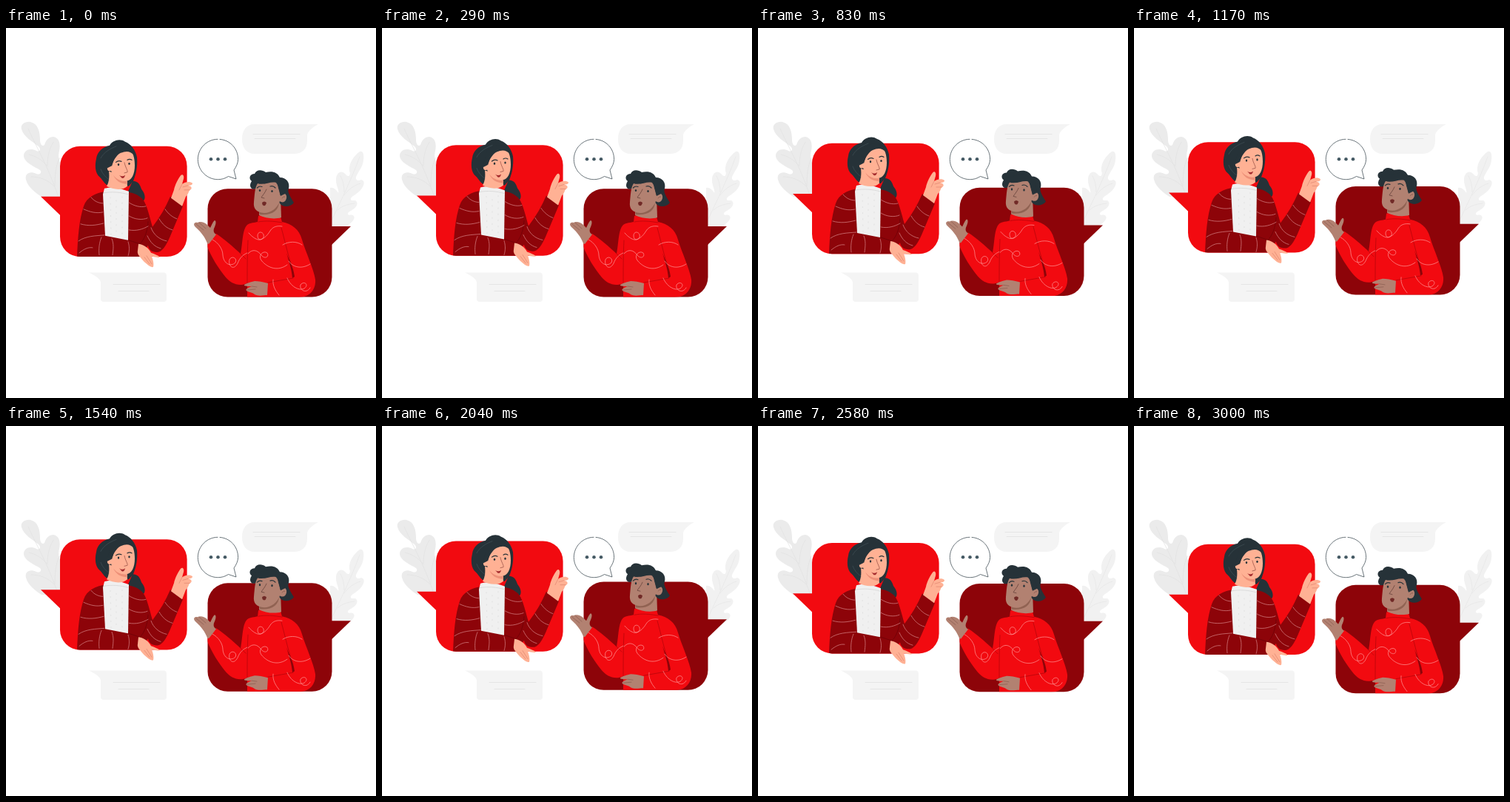
Write an HTML page with a canvas that moves like this. It is 500 by 500 pixels and loops after 3.04 s.

```html
<!DOCTYPE html>
<html lang="en">
<head>
<meta charset="utf-8">
<title>Conversation</title>
<style>
html, body { margin: 0; width: 100%; height: 100%; overflow: hidden; background: #fff; }
canvas { display: block; width: 500px; height: 500px; }
</style>
</head>
<body>
<canvas id="stage"></canvas>
<script>
const canvas = document.getElementById('stage');
const ctx = canvas.getContext('2d');
const scale = window.devicePixelRatio || 1;
canvas.width = canvas.height = 500 * scale;

const LOOP = 3040, FLOAT = 3000, RISE = 7;
const RED = '#f20a10', DARK = '#8d0409', INK = '#263238';
const PEACH = '#ffb194', BROWN = '#b28171', PALE = '#f4f4f4';

function fill(d, color) {
  ctx.fillStyle = color;
  ctx.fill(new Path2D(d));
}

function line(d, color, width = 0.7) {
  ctx.strokeStyle = color;
  ctx.lineWidth = width;
  ctx.stroke(new Path2D(d));
}

function dot(x, y, rx, color, ry = rx) {
  ctx.fillStyle = color;
  ctx.beginPath();
  ctx.ellipse(x, y, rx, ry, 0, 0, Math.PI * 2);
  ctx.fill();
}

function card(x, y, w, h, r) {
  const p = new Path2D();
  p.roundRect(x, y, w, h, r);
  return p;
}

function leaves() {
  fill('M21 137C19 130 26 126 33 127C43 129 46 140 46 151C46 157 49 161 52 158C54 151 58 147 64 147C72 148 74 157 72 166C70 174 72 178 73 182V228H48C39 222 29 214 27 205C25 196 33 193 41 197C46 199 49 195 46 192C38 187 25 182 24 173C24 164 34 162 41 166C46 168 48 164 44 160C35 153 24 147 21 137Z', '#ebebeb');
  line('M30 136C39 157 56 185 70 226M31 171C40 173 49 178 56 187M34 201C45 201 57 205 65 214M64 154C58 164 56 174 56 186M72 176C67 187 66 199 66 214', '#e1e1e1');

  fill('M478 167C483 165 484 172 483 179C482 188 476 194 473 201C472 206 476 207 480 205C486 206 484 214 479 219C475 224 469 226 466 230C465 234 469 233 472 233C477 236 474 242 469 245C465 248 461 249 462 252C464 254 467 251 470 254C473 259 464 266 457 269L438 267V216C442 215 447 219 449 223C451 220 445 212 446 203C448 193 455 192 460 199C464 202 466 198 464 193C463 182 471 172 478 167Z', '#f1f1f1');
  line('M478 174C469 199 454 231 438 264M452 200C456 207 457 215 457 222M479 210C469 213 462 219 457 226M471 237C461 238 453 241 448 246', '#e5e5e5');
}

function notes() {
  fill('M336 130H422C416 133 409 138 407 144V152C407 164 400 170 389 170H336C325 170 319 162 319 150C319 138 325 130 336 130Z', PALE);
  line('M334 143.5H397M336 149.5H391', '#e0e0e0');
  fill('M112 330.5H213Q217 330.5 217 335V366Q217 370 213 370H132Q128 370 128 366V344C127 338 119 334 112 330.5Z', PALE);
  line('M145 346.5H208M152 355.5H193', '#e0e0e0');
}

function typing() {
  line('M289 150.4C303 151.5 313.6 163 313.6 177.5C313.6 182 311.5 187 308 192L311 204L300.5 200.5C296 203.5 291 204.7 286.5 204.7C271.5 204.7 259.3 192.5 259.3 177.5C259.3 162.5 271.5 150.3 286 150.3', '#455158', 0.8);
  for (let i = 0; i < 3; i++) dot(277 + i * 9.5, 177.3, 2.3, '#455a64');
}

function woman() {
  const box = card(73, 159.8, 171.6, 149.4, 27);
  ctx.fillStyle = RED;
  ctx.fill(box);
  fill('M47 228H74V254Z', RED);

  fill('M171 207C179 207 181 212 183 218C189 225 189 233 184 235C175 238 169 231 165 221Z', INK);

  ctx.save();
  ctx.clip(box);
  fill('M135 221C121 223 109 229 105 241C99 259 97 282 96 310H180L192 294C193 301 199 304 206 303C213 301 218 291 223 279L239 241L222 228C216 242 208 256 198 269C194 256 191 240 185 232C179 225 171 223 165 222Z', DARK);
  ctx.restore();
  line('M192 262C191 276 187 286 181 292M166 287L181 292', '#6e0207', 0.8);

  fill('M133 217C142 214 156 217 166 221L165 287L134 281L131 225Z', '#f0f0f0');
  line('M132 223C143 221 155 222 165 225', '#d2d2d2');
  ctx.setLineDash([1.2, 7]);
  line('M141 229L142 279M149 233L149 280M157 228L157 282', '#dadada');
  ctx.setLineDash([]);

  const wool = '#d8898c';
  line('M115 229C119 234 125 237 131 237M105 245C114 249 122 251 131 249M101 265C111 268 121 267 132 264M98 288C108 281 121 281 133 280', wool);
  line('M166 236C174 241 182 243 189 241M166 254C174 259 184 260 191 257M166 273C176 275 185 272 192 268', wool);
  line('M129 283C126 290 125 299 126 307M143 285C146 292 145 299 144 307M165 289C167 295 167 302 165 308M99 304C105 299 111 296 117 297', wool);
  line('M215 245C219 251 225 256 231 258M207 258C211 265 217 271 225 273M196 270C199 279 207 286 217 288M191 281C195 290 201 296 209 298', wool);

  fill('M223 230L227 219C228 213 233 203 236.5 199C239 197 241 200 240 204L238 211C242 208 249 207 252 210C252 213 248 213 246 213C251 214 252 217 249 219C246 221 247 225 243 228L238 241Z', PEACH);
  line('M238 211L234 219M246 213L239 215M248 219L241 219', '#d97c68', 0.6);
  fill('M179 292C187 293 193 298 196 304C201 306 205 307 208 310C204 311 200 309 197 309C199 314 200 320 199 323C196 325 187 317 183 312C180 308 177 306 178 301Z', PEACH);
  line('M190 308L197 319M187 310L194 319', '#d97c68', 0.6);

  // Hair behind, then neck and face
  fill('M140 159C144 152 154 149 161 154C169 157 175 165 177 175C178 187 176 197 172 207L166 214L141 213C134 214 132 207 127 202C120 197 120 185 122 177C123 168 130 161 140 159Z', INK);
  fill('M139 194L163 201L164 214C158 220 145 219 136 214C139 209 140 202 139 194Z', PEACH);
  fill('M145 199C150 205 156 208 164 207L164 211C154 211 148 206 145 199Z', '#ed9078');
  fill('M148 171C154 167 160 164 166 163C172 168 174 176 174 186C174 197 170 207 162 207C151 207 144 200 142 193C139 195 136 192 137 188C138 185 141 185 143 187Z', PEACH);
  fill('M142 187C145 180 149 172 155 169C162 166 168 166 173 172C170 162 162 158 154 160L142 167L136 190Z', INK);
  dot(152, 184.7, 1.2, INK, 1.6);
  dot(166.5, 183.5, 1.2, INK, 1.6);
  line('M148.5 181.5Q152 178.5 156 180.5M164 178.5Q167 176.5 170 178.5', INK, 1.2);
  line('M160 182C161 188 165 193 164 195L160 196', '#9b5549', 0.8);
  fill('M153 199Q157 202 161 199Q160 204 156.5 203Z', '#a52c2e');
  line('M128 176C132 168 141 163 149 160M128 191C130 197 135 202 139 205', '#46545b', 0.6);
}

function man() {
  const box = card(272.5, 217.2, 168, 146.4, 27);
  ctx.fillStyle = DARK;
  ctx.fill(box);
  fill('M439 268H466L439 294Z', DARK);

  ctx.save();
  ctx.clip(box);
  fill('M341 254C350 251 363 252 371 255L373 262C387 265 396 272 400 286C405 303 416 326 418 340C419 354 410 364 396 364H326V345C314 350 304 345 297 337C287 325 277 309 271 293L284 278C295 285 307 296 317 305C320 291 319 273 326 266C330 263 336 263 340 262Z', RED);
  ctx.restore();
  fill('M379 304C383 315 388 321 390 336L387 338C386 325 382 315 379 304Z', DARK);
  line('M372 270C377 288 380 303 385 318M327 287C326 308 326 328 326 345M317 305L324 312M354 344L388 338M341 262C351 260 362 261 373 263', '#b6060b', 0.8);

  const thread = '#ff9b9b';
  line('M328 277C334 284 343 290 348 283C350 276 341 273 340 280C340 292 352 283 357 274C361 268 367 267 373 268', thread);
  line('M327 305C333 298 340 300 345 307C350 313 356 309 353 304C348 300 340 307 345 314C354 325 368 329 380 320', thread);
  line('M374 293C382 288 393 288 400 293M382 315C388 324 400 326 411 319', thread);
  line('M279 286C287 290 293 299 293 307C294 319 304 323 310 317C313 311 305 307 302 313C300 321 307 329 313 318C316 310 321 306 326 304', thread);
  line('M361 340C360 348 364 355 369 361M380 338C384 348 395 356 403 352C410 347 403 341 398 347C396 354 406 360 411 351', thread);

  fill('M272 291C269 283 264 276 256 269C252 265 255 262 259 263C262 261 268 262 272 266L276 270C278 266 280 261 282 260C285 261 283 267 281 271C280 275 281 277 284 279L274 292Z', BROWN);
  line('M257 265L267 273M261 263L270 271', '#82564b', 0.6);
  fill('M354 345C347 343 341 342 336 342C331 343 325 345 322 347C321 349 328 349 332 349C327 351 323 353 325 355C328 357 333 357 336 360C341 363 348 361 353 361Z', BROWN);
  line('M332 349L339 350M326 354L337 353', '#82564b', 0.6);

  fill('M343 237L371 227L372 256C363 259 350 257 342 253Z', BROWN);
  fill('M343 248C354 249 363 244 369 235C369 247 358 254 343 252Z', '#906252');
  fill('M332 207C327 203 330 197 336 197C338 191 346 191 351 195C360 193 367 195 370 202C379 202 384 209 382 217C380 221 383 226 389 236C385 242 374 243 370 237L363 221L340 216C332 221 327 214 332 207Z', INK);
  fill('M340 210C348 213 358 207 365 209C369 214 369 219 371 226C376 221 380 225 379 230C378 235 374 237 370 234C367 243 358 250 349 250C338 249 334 244 335 235C336 226 336 216 340 210Z', BROWN);
  fill('M336 213C341 207 346 211 351 210C357 207 363 206 367 209C367 214 369 219 371 227L377 224L374 207L359 199L337 203Z', INK);
  dot(343, 219.5, 1.2, INK, 1.6);
  dot(359.5, 220.5, 1.2, INK, 1.6);
  line('M339.5 216Q342 213 346 214.5M357 214Q361 212.5 364 216', INK, 1.2);
  line('M352 218C350 223 346 227 345 229L349 230', '#67433b', 0.8);
  fill('M346 236Q349 233 352 236Q351 241 348 240Q346 239 346 236Z', '#712a27');
  line('M373 230Q375 227 377 228', '#82564b', 0.7);
}

function shifted(y, draw) {
  ctx.save();
  ctx.translate(0, y);
  draw();
  ctx.restore();
}

// Linear rise and fall; zero until the start time.
function lift(t) {
  const u = Math.max(0, t) / FLOAT % 1;
  return -RISE * (1 - Math.abs(2 * u - 1));
}

function render() {
  const t = performance.now() % LOOP;
  ctx.setTransform(scale, 0, 0, scale, 0, 0);
  ctx.fillStyle = '#fff';
  ctx.fillRect(0, 0, 500, 500);
  ctx.lineCap = ctx.lineJoin = 'round';
  leaves();
  notes();
  typing();
  shifted(lift(t + 30), woman);
  shifted(lift(t - 500), man);
  requestAnimationFrame(render);
}
render();
</script>
</body>
</html>
```
